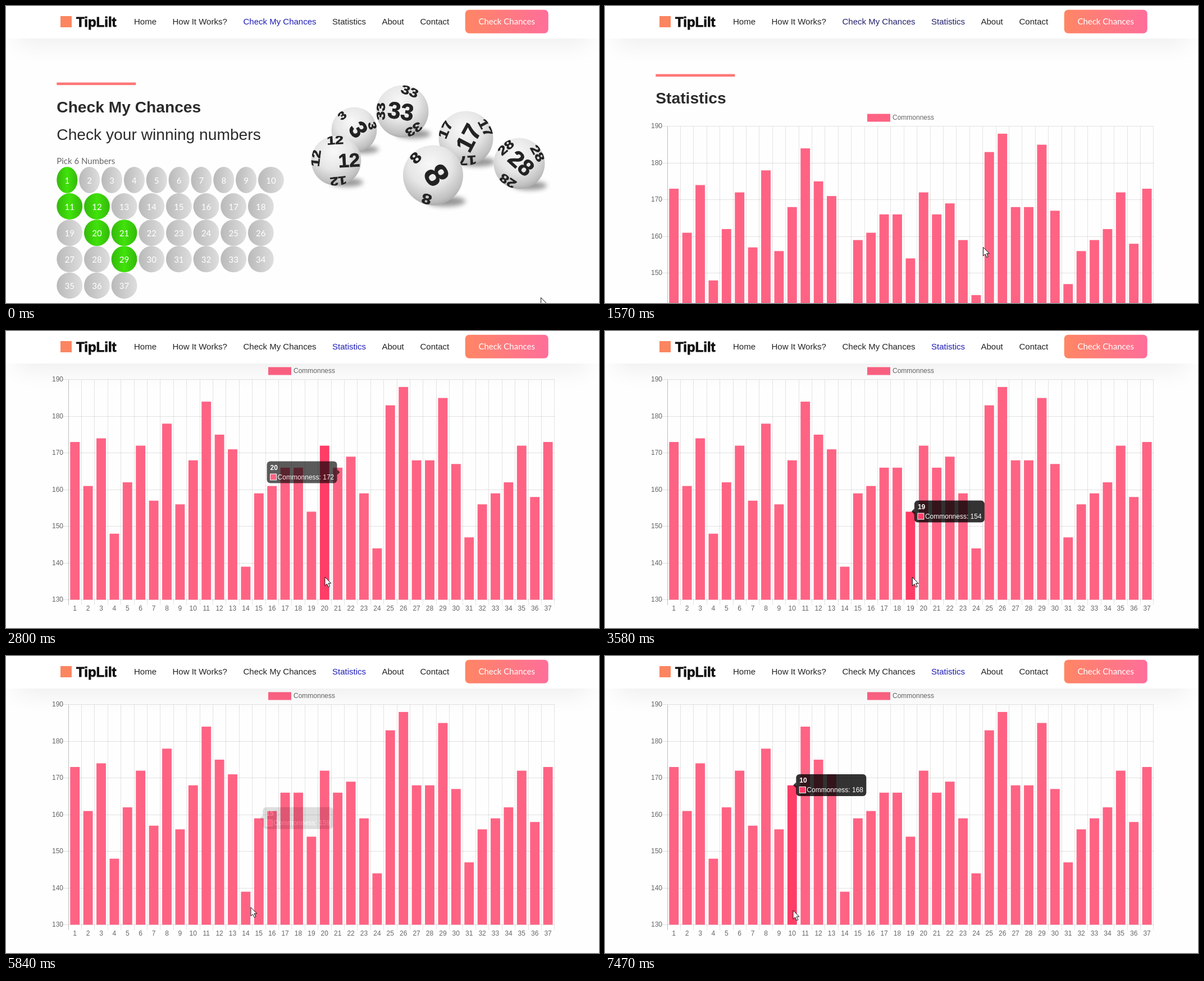
Animation, 1056 px wide and 530 px high, one loop 8000 ms. Source, as an HTML page:

```html
<!DOCTYPE html>
<html lang="en">
<head>
<meta charset="utf-8">
<title>Check My Chances</title>
<style>
html, body { margin: 0; width: 100%; height: 100%; overflow: hidden; background: #fefefe; }
svg { display: block; width: 1056px; height: 530px; font-family: "Liberation Sans", Arial, sans-serif; }
.lato { font-family: Lato, sans-serif; font-size: 15px; }
.mid { text-anchor: middle; }
.bold { font-weight: bold; }
.title { font-weight: bold; font-size: 28.2px; fill: #2b2b2b; }
.small { font-size: 12px; fill: #666; }
</style>
</head>
<body>
<svg id="stage" viewBox="0 0 1056 530"></svg>
<script>
const LOOP = 8000, CHART_Y = 849, FADE = 400, PITCH = 23.4, BAR_W = 16.85;

// The chart's data, one value per number
const VALUES = [173, 161, 174, 148, 162, 172, 157, 178, 156, 168, 184, 175, 171,
  139, 159, 161, 166, 166, 154, 172, 166, 169, 159, 144, 183, 188, 168, 168,
  185, 167, 147, 156, 159, 162, 172, 158, 173];

// Pointer path: time, x, y
const MOUSE = [[0, 953, 520.5], [720, 673.5, 430.5], [2440, 673.5, 430.5], [2646, 646, 434],
  [2726, 576, 438], [2800, 568, 439], [3185, 552.4, 439], [3330, 548, 439], [4130, 546, 440],
  [4756, 505.6, 445], [4840, 499, 446], [5690, 441.9, 448], [5840, 436, 448.5],
  [6600, 388.6, 451], [7130, 341.8, 454], [7470, 335, 454]];

const clamp = v => Math.max(0, Math.min(1, v));
const mix = (a, b, k) => a + (b - a) * k;
const smooth = k => k * k * (3 - 2 * k);
const outQuart = k => 1 - (1 - clamp(k)) ** 4;

// Smooth wheel scroll with a longer tail
const glide = (t, start, end) => smooth(1 - (1 - clamp((t - start) / (end - start))) ** 1.235);
const scrollAt = t => Math.round(479 * glide(t, 60, 720) + 370 * glide(t, 955, 2120));

function mouseAt(t) {
  const i = MOUSE.findIndex(k => k[0] > t);
  if (i < 0) return MOUSE[MOUSE.length - 1].slice(1);
  const [t0, x0, y0] = MOUSE[i - 1], [t1, x1, y1] = MOUSE[i], k = (t - t0) / (t1 - t0);
  return [mix(x0, x1, k), mix(y0, y1, k)];
}

const barX = n => 111 + PITCH * (n - .5);
const valueY = v => 479.5 - (v - 130) * 6.545;
const barTop = n => valueY(VALUES[n - 1]);

// Bar under the pointer, 0 in the gaps
function barAt(x) {
  const n = Math.floor((x - 111) / PITCH) + 1;
  return Math.abs(x - barX(n)) <= BAR_W / 2 ? n : 0;
}

const hovers = [];
for (let t = 2440, last = 0; t < LOOP; t += 2) {
  const n = barAt(mouseAt(t)[0]);
  if (n !== last) hovers.push([t, last = n]);
}

const text = (x, y, s, attrs = '') => `<text x="${x}" y="${y}" ${attrs}>${s}</text>`;
const rect = (x, y, w, h, fill, attrs = '') =>
  `<rect x="${x}" y="${y}" width="${w}" height="${h}" fill="${fill}" ${attrs}/>`;
const line = (x1, y1, x2, y2, alpha) =>
  `<path d="M${x1} ${y1}L${x2} ${y2}" stroke="#000" stroke-opacity="${alpha}"/>`;
const button = (x, y, w, h, s) => rect(x, y, w, h, 'url(#coral)', 'rx="7"') +
  text(x + w / 2, y + h / 2 + 5.5, s, 'class="lato mid" fill="#fff"');
const accent = y => rect(90.3, y, 141, 4.6, '#fd7777');

function pickRow(y, from, to, chosen) {
  let x = 90.3, out = '';
  for (let n = from; n <= to; n++) {
    const w = n < 10 ? 37.1 : 45.9;
    out += `<ellipse cx="${x + w / 2}" cy="${y + 23.5}" rx="${w / 2}" ry="23.5"
      fill="url(#${chosen.includes(n) ? 'green' : 'grey'})"/>` +
      text(x + w / 2, y + 30, n, 'class="lato mid" fill="#fff"');
    x += w + 2.75;
  }
  return out;
}

function picks() {
  let out = '';
  for (let from = 1, y = 287; from <= 37; y += 47.1) {
    const to = Math.min(37, from + (from === 1 ? 9 : 7));
    out += pickRow(y, from, to, [1, 11, 12, 20, 21, 29]);
    from = to + 1;
  }
  return out;
}

// Main number near the centre, foreshortened copies around the rim
function lottoBall(n, cx, cy, r, turn, rim, dx = 4) {
  const id = 'ball' + n;
  const size = r * (n < 10 ? 1.1 : .9) * Math.sqrt(1 - (dx / r) ** 2);
  const label = (x, y, angle, s, flat) => text(0, s * .36, n, `class="bold mid" font-size="${s}"
    fill="#222" stroke="#222" stroke-width=".8"
    transform="translate(${x} ${y}) rotate(${angle}) scale(1 ${flat})"`);
  const copies = rim.map(deg => {
    const a = deg * Math.PI / 180;
    return label(cx + r * .83 * Math.cos(a), cy + r * .83 * Math.sin(a), deg + 90, r * .6, .8);
  }).join('');
  return `<ellipse cx="${cx + r * .42}" cy="${cy + r * .87}" rx="${r * .66}" ry="${r * .17}"
      fill="#000" opacity=".4" filter="url(#soft)"/>
    <clipPath id="${id}"><circle cx="${cx}" cy="${cy}" r="${r}"/></clipPath>
    <circle cx="${cx}" cy="${cy}" r="${r}" fill="url(#pearl)"/>
    <g clip-path="url(#${id})">${label(cx + dx, cy - 1, turn, size, 1)}${copies}</g>`;
}

const lottery = () => lottoBall(33, 706, 188, 46.5, 8, [-70, 58, 180], -3) +
  lottoBall(3, 620, 221, 40.5, 58, [-130, -13], 8) +
  lottoBall(12, 588, 276, 44.5, -3, [-93, 84, 187], 23) +
  lottoBall(17, 819, 236, 48.5, -62, [-28, 86, 203]) +
  lottoBall(8, 760.5, 302, 53.5, 58, [-135, 105], 7) +
  lottoBall(28, 914, 281, 45.5, 42, [-29, 123, 230]);

function chart() {
  let out = rect(467, 64.5, 41, 14, '#ff6384') + text(512, 75, 'Commonness', 'class="small"');
  for (let v = 130; v <= 190; v += 10) {
    const y = Math.floor(valueY(v)) + .5;
    out += line(101, y, 977, y, .11) + text(102, y + 3.5, v, 'class="small" text-anchor="end"');
  }
  for (let i = 0; i <= 37; i++) {
    const x = Math.floor(111 + PITCH * i) + .5;
    out += line(x, 87, x, 489, i ? .1 : .25);
  }
  VALUES.forEach((v, i) => {
    const x = barX(i + 1), y = valueY(v);
    out += rect(x - BAR_W / 2, y, BAR_W, 479.5 - y, '#ff6384', 'class="bar"') +
      text(x, 499, i + 1, 'class="small mid"');
  });
  return out;
}

const stops = (...list) => list.map(([at, c]) => `<stop offset="${at}" stop-color="${c}"/>`).join('');
const linear = (id, ...list) => `<linearGradient id="${id}">${stops(...list)}</linearGradient>`;

const stage = document.getElementById('stage');
stage.innerHTML = `<defs>
  ${linear('coral', [0, '#ff8664'], [1, '#ff6e9a'])}
  ${linear('grey', [0, '#b9b9b9'], [1, '#dedede'])}
  ${linear('green', [0, '#35b80c'], [.5, '#40e30a'], [1, '#35b80c'])}
  <radialGradient id="pearl" cx=".45" cy=".32" r=".72">
    ${stops([0, '#f8f8f8'], [.5, '#e6e6e6'], [.85, '#c0c0c0'], [1, '#a2a2a2'])}
  </radialGradient>
  <filter id="soft" x="-50%" y="-150%" width="200%" height="400%"><feGaussianBlur stdDeviation="4"/></filter>
  <filter id="haze" x="-10%" y="-100%" width="120%" height="300%"><feGaussianBlur stdDeviation="20"/></filter>
</defs>
${rect(0, 0, 1056, 530, '#fefefe')}
<g id="page">
  ${accent(136.5)}
  ${text(90.3, 190, 'Check My Chances', 'class="title"')}
  ${text(90.3, 239, 'Check your winning numbers', 'font-size="28.2" fill="#2b2b2b"')}
  ${text(90.3, 281.5, 'Pick 6 Numbers', 'class="lato" fill="#666"')}
  ${picks()}
  ${text(90.3, 541.5, 'Pick Strong Number', 'class="lato" fill="#666"')}
  ${pickRow(546, 1, 7, [3])}
  ${text(90.3, 613, 'Your chances are: 65.45%', 'class="bold" font-size="20.65" fill="#2b2b2b"')}
  ${button(90.3, 664, 127, 47, 'Try Again')}
  ${lottery()}
  ${accent(842.5)}
  ${text(90.3, 895, 'Statistics', 'class="title"')}
  <g transform="translate(0 ${CHART_Y})">${chart()}
    <g id="tip">
      <path id="caret" fill-opacity=".8"/>
      ${rect(0, 0, 125, 39, '#000', 'rx="6" fill-opacity=".8"')}
      ${text(6, 15, '', 'id="tipTitle" class="bold" font-size="12" fill="#fff"')}
      ${rect(6, 22.5, 11, 11, '#ff3d67', 'stroke="#fff"')}
      ${text(19, 32, '', 'id="tipBody" font-size="12" fill="#fff"')}
    </g>
  </g>
</g>
${rect(20, 0, 1016, 70, '#000', 'opacity=".06" filter="url(#haze)"')}
${rect(0, 0, 1056, 58, '#fff')}
${rect(97, 18, 20, 20, '#fb8560')}
${text(125, 37, 'TipLilt', 'class="bold" font-size="24" fill="#111" stroke="#111" stroke-width=".8"')}
<g font-size="15" fill="#222">
  ${text(228, 33, 'Home')}${text(296.5, 33, 'How It Works?')}
  ${text(422.5, 33, 'Check My Chances', 'id="navCheck"')}${text(581, 33, 'Statistics', 'id="navStats"')}
  ${text(669.5, 33, 'About')}${text(737.5, 33, 'Contact')}
</g>
${button(817.7, 6.7, 148, 42, 'Check Chances')}
<path id="mouse" d="M0 0V15.5L3.6 12.2 6.2 18 8.8 16.9 6.2 11.2H10.8Z" fill="#fff" stroke="#111" stroke-linejoin="round"/>`;

const [page, tip, caret, tipTitle, tipBody, navCheck, navStats, mouse] =
  ['page', 'tip', 'caret', 'tipTitle', 'tipBody', 'navCheck', 'navStats', 'mouse']
    .map(id => document.getElementById(id));
const bars = [...stage.querySelectorAll('.bar')];

const navColor = k => `rgb(${[[34, 30], [34, 28], [34, 180]].map(([a, b]) => Math.round(mix(a, b, k)))})`;

// Bars up to the middle show their label on the right, later ones on the left
const opensRight = n => n <= 19;
const tipSpot = n => [barX(n) + (opensRight(n) ? 7 : -132), barTop(n) - 19.8];

// Every hover change restarts the glide from wherever the label is
function tipAt(t) {
  let label = hovers[0][1], active = 0, start = 0;
  let from = [...tipSpot(label), 0], to = from;
  const view = at => from.map((v, i) => mix(v, to[i], outQuart((at - start) / FADE)));
  for (const [at, n] of hovers) {
    if (at > t) break;
    from = view(at);
    to = n ? [...tipSpot(n), 1] : [to[0], to[1], 0];
    start = at;
    active = n;
    if (n) label = n;
  }
  return { spot: view(t), label, active };
}

function draw(t) {
  page.setAttribute('transform', `translate(0 ${-scrollAt(t)})`);
  mouse.setAttribute('transform', `translate(${mouseAt(t).join(' ')})`);

  const k = clamp((t - 1410) / 320);
  navCheck.setAttribute('fill', navColor(1 - k));
  navStats.setAttribute('fill', navColor(k));

  const { spot: [x, y, alpha], label, active } = tipAt(t);
  bars.forEach((b, i) => b.setAttribute('fill', i + 1 === active ? '#ff3d67' : '#ff6384'));
  tip.setAttribute('transform', `translate(${x} ${y})`);
  tip.setAttribute('opacity', alpha);
  caret.setAttribute('d', opensRight(label) ? 'M0 14.5L-5 19.5 0 24.5Z' : 'M125 14.5L130 19.5 125 24.5Z');
  tipTitle.textContent = label;
  tipBody.textContent = 'Commonness: ' + VALUES[label - 1];
}

const begin = performance.now();
function tick() {
  draw((performance.now() - begin) % LOOP);
  requestAnimationFrame(tick);
}
tick();
</script>
</body>
</html>
```
